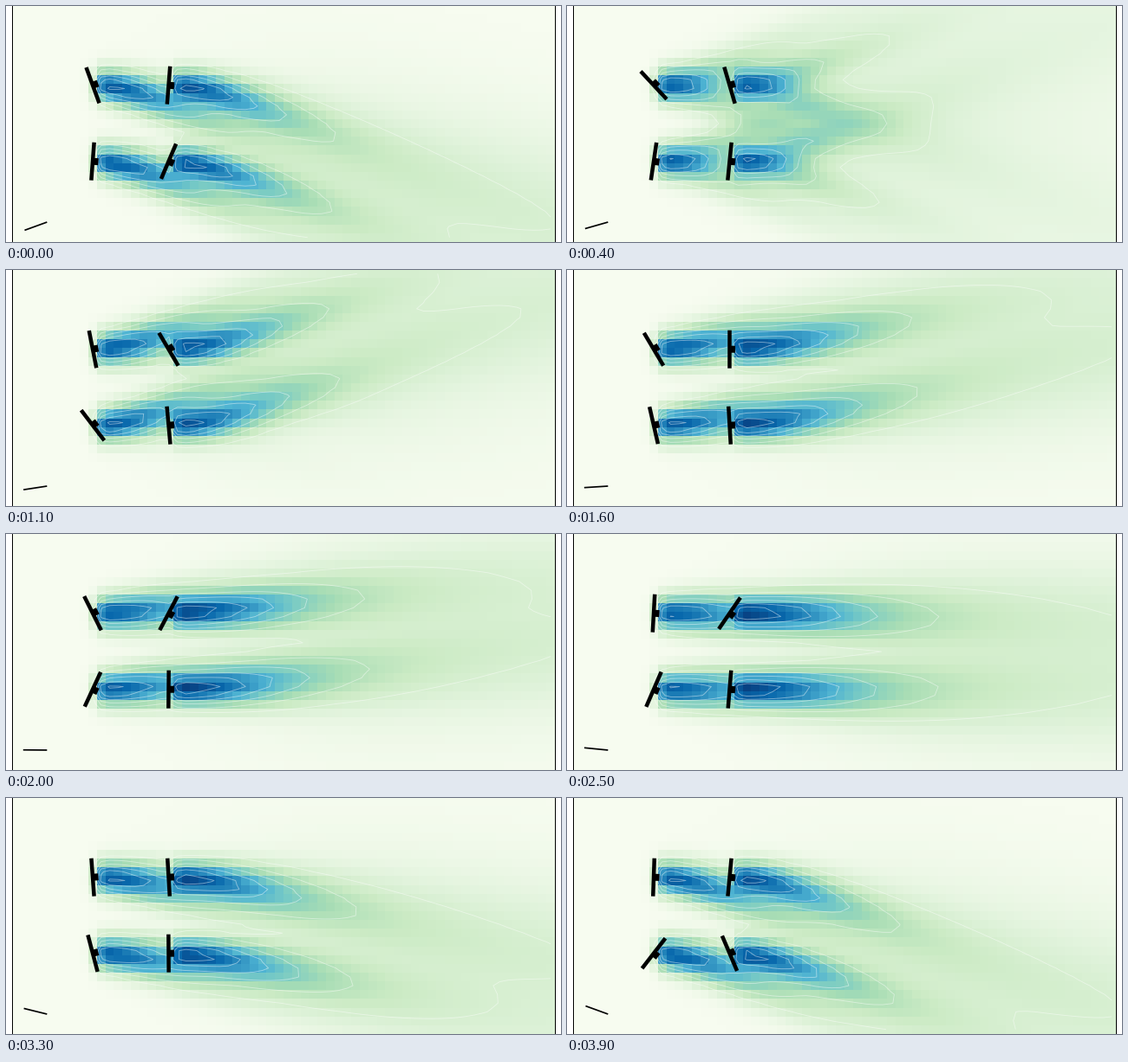
Recreate the animation shown at these times as a matplotlib script. Size 640 by 273 pixels, loop 4 s.

```python
from itertools import product

import numpy as np
import matplotlib.pyplot as plt
from matplotlib.animation import FuncAnimation

W, H, DPI = 640, 273, 80
PX = 72 / DPI                      # points per pixel
FRAMES, INTERVAL = 40, 100
LAST = FRAMES - 1

LEFT, RIGHT = 7, 633
COLS, ROWS = 64, 27
CELL_W, CELL_H = (RIGHT - LEFT) / COLS, 10.13
TOP = (H - 1 - ROWS * CELL_H) / 2
BOTTOM = TOP + ROWS * CELL_H

xs = LEFT + CELL_W * (np.arange(COLS) + 0.5)
ys = TOP + CELL_H * (np.arange(ROWS) + 0.5)
X, Y = np.meshgrid(xs, ys)

FRONT, BACK = 100, 187.5
ROTORS = list(product((FRONT, BACK), (91.7, 179.7)))
MAX_SLOPE = 0.42
LEVELS = np.linspace(0.18, 0.88, 6)


def wind(n):
    """Wind angle in degrees, turning evenly through the loop."""
    return 20 - 40 * n / LAST


def wave(n, period, peak):
    return np.cos(2 * np.pi * (n - peak) / period)


def yaw_offsets(n):
    """Yaw of each rotor relative to the wind, in the order of ROTORS."""
    return (18 * wave(n, 12, 0) - 18,
            30 * wave(n, 20, 2),
            28 * wave(n, 26, 22.7) + 5,
            43 * (1 - 2 * n / LAST) ** 3)


def wake(x0, y0, slope, peak, reach):
    """Velocity deficit behind one rotor."""
    s = X - x0
    d = np.maximum(s, 0)
    ramp = 1 / (1 + np.exp(-(s - 3.5) / 3.2))
    decay = 1 / (1 + (d / reach) ** 2.4)
    center = y0 + slope * d ** 2 / (d + 80)
    sigma = 12.5 + 0.06 * d
    return peak * ramp * decay * np.exp(-0.5 * ((Y - center) / sigma) ** 2)


def flow(slope):
    """Combined deficit of all rotors for one wake slope."""
    shrink = 1 - 0.4 * abs(slope)
    total = np.zeros_like(X)
    for x0, y0 in ROTORS:
        reach = 120 if x0 == FRONT else 145 * shrink
        total += wake(x0, y0, slope, 0.93, reach) ** 2.5
    center = H / 2 + 0.6 * slope * (X - BACK)
    haze = 0.14 / (1 + np.exp(-(X - 320) / 60))
    haze = haze * np.exp(-0.5 * ((Y - center) / 80) ** 2)
    return total ** 0.4 + haze


def field(n):
    # wakes lag behind the wind; those of the loop's end fade out at its start
    slope = -1.5 * np.tan(np.radians(wind(n - 5)))
    slope = np.clip(slope, -MAX_SLOPE, MAX_SLOPE)
    old = np.exp(-(n / 5) ** 1.3)
    return np.clip(old * flow(MAX_SLOPE) + (1 - old) * flow(slope), 0, 1)


fig = plt.figure(figsize=(W / DPI, H / DPI), dpi=DPI, facecolor="white")
ax = fig.add_axes([0, 0, 1, 1])
ax.axis("off")

image = ax.imshow(field(0), cmap="GnBu", vmin=0, vmax=1, aspect="auto",
                  interpolation="nearest", extent=(LEFT, RIGHT, BOTTOM, TOP))
ax.set_xlim(0, W)
ax.set_ylim(H, 0)
ax.set_autoscale_on(False)
for x in (LEFT, RIGHT):
    ax.plot([x, x], [-5, H + 5], color="black", lw=PX, zorder=4)


def bar(width):
    return ax.plot([], [], color="black", lw=width * PX,
                   solid_capstyle="butt", zorder=5)[0]


blades = [bar(4.5) for _ in ROTORS]
hubs = [bar(8) for _ in ROTORS]
vane = bar(1.7)
contours = []


def update(n):
    z = field(n)
    image.set_data(z)
    while contours:
        contours.pop().remove()
    contours.append(ax.contour(xs, ys, z, LEVELS, colors="white",
                               alpha=0.45, linewidths=0.9 * PX, zorder=3))

    for (x, y), yaw, blade, hub in zip(ROTORS, yaw_offsets(n), blades, hubs):
        a = np.radians(yaw - wind(n))
        c, s = np.cos(a), np.sin(a)
        blade.set_data([x + 22 * s, x - 22 * s], [y - 22 * c, y + 22 * c])
        hub.set_data([x, x + 6.5 * c], [y, y + 6.5 * s])

    a = np.radians(wind(n))
    vane.set_data([47.3, 47.3 - 27.5 * np.cos(a)],
                  [250, 250 + 27.5 * np.sin(a)])
    return [image, vane, *blades, *hubs]


anim = FuncAnimation(fig, update, frames=FRAMES, interval=INTERVAL,
                     init_func=lambda: update(0), repeat=True,
                     repeat_delay=0, blit=False)
plt.show()
```
